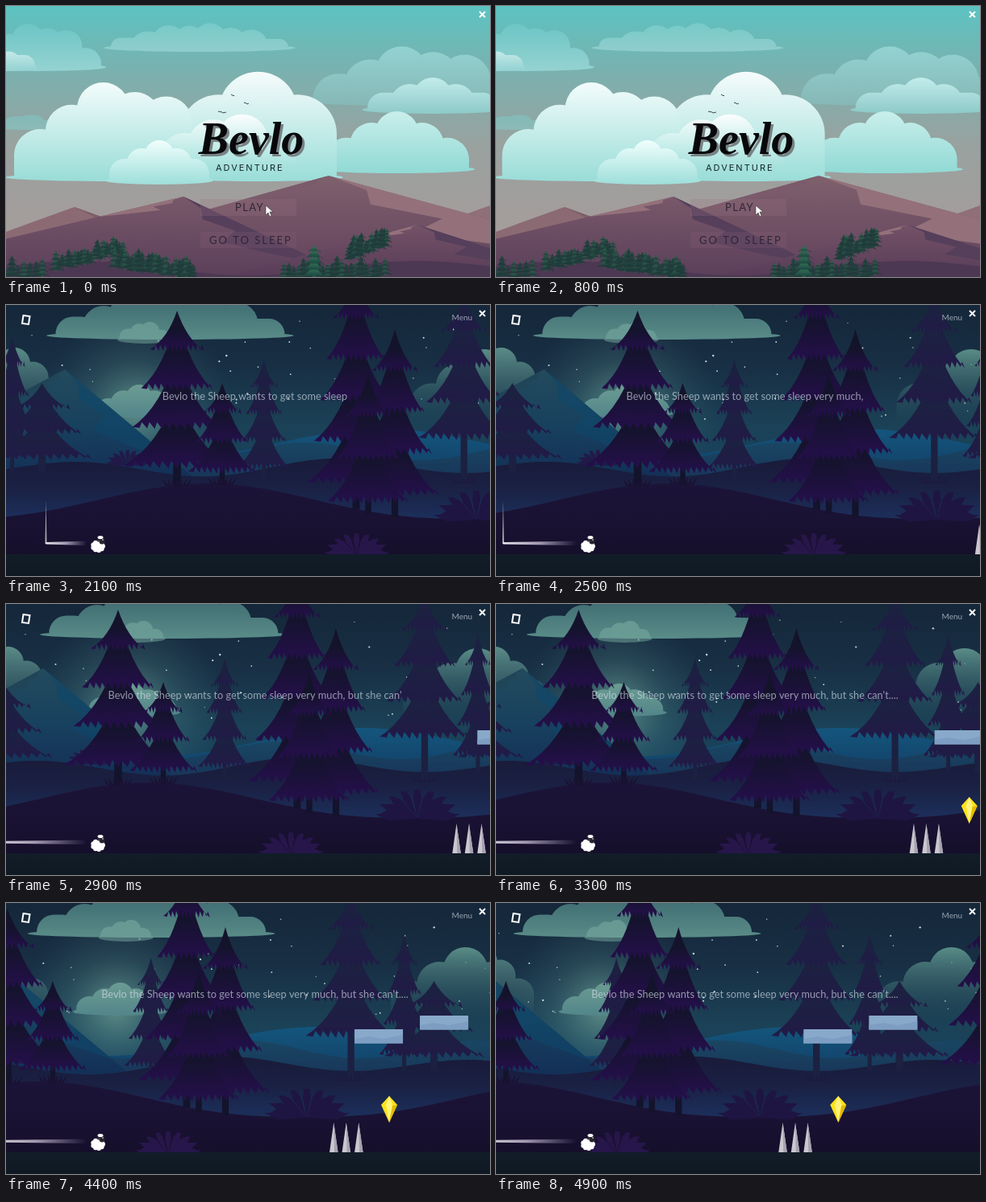
An HTML page with a canvas that plays this animation: 600 px wide and 337 px high, repeating every 5 s.

```html
<!DOCTYPE html>
<html lang="en">
<head>
<meta charset="utf-8">
<style>
html, body { margin: 0; width: 100%; height: 100%; overflow: hidden; background: #132537; }
canvas { display: block; width: 100vw; height: 100vh; }
</style>
</head>
<body>
<canvas id="stage" width="600" height="337"></canvas>
<script>
const g = document.getElementById('stage').getContext('2d');
const HERO = 'Bevlo';
const STORY = HERO + " the Sheep wants to get some sleep very much, but she can't....";
const TAU = Math.PI * 2;

// Repeatable noise from 0 to 1
const noise = n => {
  const v = Math.sin(n * 12.9898) * 43758.5453;
  return v - Math.floor(v);
};
const wave = (x, crest, period) => Math.cos(TAU * (x - crest) / period);

function fade(y0, y1, ...colors) {
  const f = g.createLinearGradient(0, y0, 0, y1);
  colors.forEach((c, i) => f.addColorStop(i / (colors.length - 1), c));
  return f;
}

function rect(x, y, w, h, fill) {
  g.fillStyle = fill;
  g.fillRect(x, y, w, h);
}

function trace(p) {
  g.beginPath();
  for (let i = 0; i < p.length; i += 2) g.lineTo(p[i], p[i + 1]);
}

function poly(fill, ...p) {
  g.fillStyle = fill;
  trace(p);
  g.fill();
}

function line(color, width, ...p) {
  g.strokeStyle = color;
  g.lineWidth = width;
  trace(p);
  g.stroke();
}

function ellipse(x, y, rx, ry, fill) {
  g.fillStyle = fill;
  g.beginPath();
  g.ellipse(x, y, rx, ry, 0, 0, TAU);
  g.fill();
}

function text(str, x, y, font, fill, spacing = 0, align = 'left') {
  g.font = font;
  g.letterSpacing = spacing + 'px';
  g.textAlign = align;
  g.fillStyle = fill;
  g.fillText(str, x, y);
}

function shifted(dx, draw) {
  g.save();
  g.translate(dx, 0);
  draw();
  g.restore();
}

function tile(shift, period, draw) {
  for (let x = -shift - period; x < 600; x += period) shifted(x, draw);
}

// Ground below the height function
function ridge(fill, height, shift = 0) {
  g.fillStyle = fill;
  g.beginPath();
  g.moveTo(0, 337);
  for (let x = 0; x <= 600; x += 5) g.lineTo(x, height(x + shift));
  g.lineTo(600, 337);
  g.fill();
}

// Round-topped columns under an arch, on a thin flat base
function cloud(x0, x1, base, h, n, top, bottom) {
  const w = x1 - x0, r = w / n * .75;
  g.fillStyle = fade(base - h, base, top, bottom);
  g.beginPath();
  for (let i = 0; i < n; i++) {
    const lift = h * Math.sqrt(Math.sin(Math.PI * (i + .5) / n)) * (i % 2 ? .9 : 1);
    g.roundRect(x0 + (w - 2 * r) * i / (n - 1), base - lift, 2 * r, lift, [r, r, 5, 5]);
  }
  const mid = (x0 + x1) / 2;
  g.moveTo(mid + w * .54, base - 2);
  g.ellipse(mid, base - 2, w * .54, 5, 0, 0, TAU);
  g.fill();
}

// Slope face with a jagged inner edge
function face(x, y, w, h, color) {
  const p = [x, y, x + w, y + h];
  for (let i = 5; i > 0; i--) p.push(x + w * i / 6 * (i % 2 ? .72 : .4), y + h * i / 6);
  poly(color, ...p);
}

function mountain(x, y, left, right, base, fill, leftFace, rightFace) {
  const h = base - y;
  poly(fill, x - left, base, x, y, x + right, base);
  face(x, y, -left * .25, h * .25, leftFace);
  face(x, y, right * .85, h * .85, rightFace);
}

function tree(x, top, bottom, half, tiers, foot, dark, edge) {
  const step = (bottom - top) / tiers, trunk = half * .13 + 1;
  rect(x - trunk / 2, bottom - step / 2, trunk, foot - bottom + step / 2, dark);
  for (let i = tiers - 1; i >= 0; i--) {
    const y0 = Math.max(top, top + step * (i - .9)), y1 = top + step * (i + 1);
    const w = half * (.35 + .65 * (i + 1) / tiers), bend = y0 + (y1 - y0) * .72;
    const tooth = Math.min(6, step * .16);
    g.fillStyle = fade(y0, y1, dark, dark, edge);
    g.beginPath();
    g.moveTo(x, y0);
    g.quadraticCurveTo(x + w * .34, bend, x + w, y1 + 2);
    for (let u = .86; u > -.9; u -= .17) {
      g.lineTo(x + w * (u + .05), y1 - tooth);
      g.lineTo(x + w * u, y1 + tooth * .5 * (1 - u * u));
    }
    g.lineTo(x - w, y1);
    g.quadraticCurveTo(x - w * .34, bend, x, y0);
    g.fill();
  }
}

// Small pines scattered around a line
function grove(x0, y0, x1, y1, n) {
  for (let i = 0; i < n; i++) {
    const u = i / (n - 1), h = 15 + 14 * noise(i + x0);
    const x = x0 + (x1 - x0) * u, y = y0 + (y1 - y0) * u + 6 * noise(i * 3 + x1);
    tree(x, y - h, y - 2, h * .36, 4, y, i % 3 ? '#25453f' : '#2d5a49', '#1c3638');
  }
}

function fern(x, y, r, fill) {
  for (let a = -1.4; a < 1.5; a += .35) {
    const s = Math.sin(a), c = Math.cos(a) * .72, w = r * .14;
    poly(fill, x, y, x + r * s * .7 - w * c, y - r * c * .7 - w * s, x + r * s - w / 2, y - r * c,
      x + r * s + w / 2, y - r * c, x + r * s * .75 + w * c, y - r * c * .7 + w * s);
  }
}

function grass(x, y, fill) {
  for (let i = -3; i <= 3; i++) poly(fill, x + i * 4 - 2, y, x + i * 6, y - 9, x + i * 4 + 2, y);
}

function closeMark() {
  line('#fff', 2, 587, 7, 594, 14);
  line('#fff', 2, 594, 7, 587, 14);
}

// ---- Menu ----
function menuSky() {
  cloud(-40, 118, 78, 57, 6, '#6cc5c5', '#93d2d1');
  cloud(-30, 36, 78, 24, 3, '#c9eceb', '#98d4d3');
  cloud(-20, 66, 151, 16, 4, '#83b9b7', '#8bbab7');
  cloud(130, 350, 54, 33, 8, '#76cac9', '#8ecdcc');
  cloud(380, 640, 121, 72, 6, '#93d3d2', '#86b8b6');
  cloud(448, 610, 131, 42, 5, '#c2edeb', '#90cbca');
  cloud(395, 574, 205, 74, 5, '#c9efec', '#93dad5');
  cloud(215, 410, 215, 148, 3, '#ffffff', '#9cded9');
  cloud(10, 270, 215, 122, 6, '#f4fdfc', '#9bddd8');
  cloud(190, 360, 200, 68, 4, '#ffffff', 'rgba(200,240,236,0)');
  cloud(128, 252, 219, 52, 5, '#f0fffd', '#a2e0dc');
}

function menu(k) {
  rect(0, 0, 600, 337, fade(0, 260, '#5cc3c1', '#7cb0ae', '#99a29f', '#a39d9c'));
  shifted(-.4 * Math.max(0, k - 2), menuSky);

  const rock = '#7b5b6b', lit = '#94717a', dark = '#553f5b';
  mountain(85, 250, 240, 240, 337, '#8b6a74', '#8b6a74', '#7d5e6b');
  mountain(612, 244, 260, 260, 337, '#8f6f78', '#8f6f78', lit);
  mountain(400, 211, 450, 460, 337, fade(211, 300, '#7f606c', '#694a61'), rock, lit);
  mountain(220, 237, 420, 210, 337, fade(237, 337, '#78586a', '#5b3f5a'), lit, dark);
  mountain(510, 272, 240, 200, 337, fade(272, 337, '#745267', '#583c58'), lit, dark);
  ridge('#4c3852', x => 326 + 9 * wave(x, 300, 420));
  grove(62, 326, 145, 305, 22);
  grove(135, 322, 232, 337, 24);
  grove(425, 312, 472, 294, 16);
  grove(345, 337, 470, 335, 22);
  grove(0, 337, 45, 337, 7);
  tree(382, 297, 336, 17, 5, 338, '#2f6a52', '#1c4440');

  for (const [x, y, r] of [[281, 111, 2], [268, 132, 5], [298, 121, 3]])
    line('#3d4950', 1, x - r, y - 1, x, y, x + 1, y + 1, x + r, y);
  const logo = 'italic bold 56px "Liberation Serif", serif';
  text(HERO, 307, 187, logo, '#788285', 0, 'center');
  text(HERO, 304, 184, logo, '#08080b', 0, 'center');
  text('ADVENTURE', 260, 205, '11px Inter, sans-serif', '#172528', 2);
  rect(241, 240, 119, 21, 'rgba(150,112,128,.25)');
  rect(241, 281, 119, 20, 'rgba(130,91,116,.25)');
  const label = '13px Lato, sans-serif';
  text('PLAY', 284, 255, label, '#302637', 1.4);
  text('GO TO SLEEP', 252, 296, label, '#302637', 2);
  closeMark();
  const arrow = [322, 248, 322, 260, 325, 257, 327, 262, 329, 261, 327, 256, 331, 256, 322, 248];
  poly('#fff', ...arrow);
  line('#333', .6, ...arrow);
}

// ---- Night level ----
function nightSky() {
  const glow = g.createRadialGradient(165, 130, 5, 165, 130, 120);
  glow.addColorStop(0, 'rgba(125,175,158,.65)');
  glow.addColorStop(.5, 'rgba(85,140,138,.25)');
  glow.addColorStop(1, 'rgba(60,110,120,0)');
  rect(20, 0, 300, 270, glow);
  for (let i = 0; i < 60; i++) {
    const r = .5 + .7 * noise(i + 200);
    ellipse(640 * noise(i + 1), 20 + 125 * noise(i + 90), r, r, '#c6dad9');
  }
  cloud(66, 350, 40, 58, 8, '#38646c', '#588a87');
  cloud(145, 208, 45, 25, 4, 'rgba(130,180,168,.5)', 'rgba(120,170,160,.5)');
  cloud(-50, 80, 145, 92, 5, '#5b8c88', 'rgba(70,115,120,0)');
  cloud(115, 224, 137, 38, 5, '#6c9c93', '#54878a');
  cloud(505, 690, 150, 95, 5, '#5a8d87', 'rgba(40,85,100,0)');
}

function spruce(...shape) {
  tree(...shape, '#14132c', '#240f4a');
}

function paleSpruce(...shape) {
  tree(...shape, '#1c2141', '#211a47');
}

function midTrees() {
  paleSpruce(35, 38, 188, 31, 4, 209);
  paleSpruce(72, 97, 190, 62, 3, 209);
  paleSpruce(347, 68, 202, 33, 4, 217);
  paleSpruce(595, -12, 165, 56, 4, 223);
  fern(178, 199, 26, '#211a47');
  grass(595, 222, '#1d1a40');
}

function nearTrees() {
  spruce(253, 7, 200, 66, 4, 226);
  spruce(309, 97, 207, 42, 3, 224);
  spruce(475, -35, 220, 60, 5, 254);
  spruce(523, 30, 235, 55, 4, 264);
  spruce(490, 85, 244, 50, 3, 260);
  fern(624, 267, 50, '#1f1542');
  grass(253, 225, '#1b1233');
  grass(309, 223, '#1b1233');
}

function level() {
  for (let x = 680; x < 715; x += 15.5) {
    poly('#cbc7cf', x, 310, x + 5.2, 273, x + 10.5, 310);
    poly('#a7a2b0', x + 5.2, 273, x + 10.5, 310, x + 6, 310);
  }
  poly('#ffe31c', 744, 251, 754, 240, 764, 251, 754, 273);
  poly('#fff37c', 754, 240, 758, 251, 754, 273, 750, 251);
  poly('#e5b900', 764, 251, 754, 273, 758, 252);
  for (const [x, y] of [[711, 157], [792, 140]]) {
    rect(x, y, 60, 17.5, '#88a9ca');
    poly('#7d9ec2', x, y + 12, x + 18, y + 9, x + 36, y + 12, x + 60, y + 7, x + 60, y + 17.5, x, y + 17.5);
  }
}

function sheep(x, y) {
  rect(x - 4, y + 7, 2, 5, '#18141e');
  rect(x + 3, y + 7, 2, 5, '#18141e');
  for (let a = 0; a < TAU; a += TAU / 9)
    ellipse(x + 6 * Math.cos(a), y + 2 + 5 * Math.sin(a), 3, 3, '#fff');
  ellipse(x, y + 2, 7, 6, '#fff');
  ellipse(x + 5, y - 5, 3.6, 4.5, '#272330');
  ellipse(x + 1, y - 5, 2.4, 1.4, '#3b3540');
  ellipse(x + 3, y - 9, 3.5, 2, '#fff');
  ellipse(x + 6, y - 6, .8, .8, '#fff');
}

function trail(x, run, y) {
  if (!run) {
    poly('rgba(190,202,240,.65)', x, 243, x + 4, y - 7, x - 4, y - 7);
    return;
  }
  poly('rgba(230,230,235,.75)', x, 243, x + 1, 297, x - 1, 297);
  const start = Math.max(x, -25), f = g.createLinearGradient(start, 0, 100, 0);
  f.addColorStop(0, 'rgba(255,255,255,.9)');
  f.addColorStop(.5, 'rgba(235,225,245,.65)');
  f.addColorStop(1, 'rgba(210,200,235,0)');
  poly(f, start, 295, 100, 293.5, 100, 299, start, 297.5);
}

function night(k) {
  const run = 10.15 * Math.max(0, k - 14.35);
  const cam = Math.max(0, run - 22);
  const y = Math.min(298, 250 + 1.6 * (k - 9) ** 2);

  rect(0, 0, 600, 337, fade(0, 230, '#15273a', '#182f44', '#1b4257', '#15405f'));
  shifted(-cam * .1, nightSky);
  ridge(fade(150, 225, '#14577e', '#123a62'), x => 172 - 18 * wave(x, 480, 520), cam * .33);
  ridge(fade(165, 225, '#1a4864', '#173257'), x => 182 - 11 * wave(x, 385, 290), cam * .33);
  shifted(-cam * .33, () => mountain(88, 80, 250, 160, 215,
    fade(80, 215, '#234a5c', '#18415f', '#132f56'), '#204558', 'rgba(14,72,108,.55)'));
  ridge(fade(188, 268, '#191a38', '#1a2144', '#1c305c'),
    x => 202 - 9 * wave(x, 120, 313) + 3 * wave(x, 200, 626), cam * .6);
  tile(cam * .6, 626, midTrees);
  ridge(fade(220, 310, '#1c1438', '#1a1233', '#150f2b'),
    x => 266 - 44 * ((1 + wave(x, 290, 660)) / 2) ** 1.4, cam * .9);
  tile(cam * .9, 660, nearTrees);
  fern(480 - cam, 312, 39, '#27164a');
  rect(0, 310, 600, 27, fade(310, 337, '#111d28', '#0f1923'));
  shifted(-cam, level);
  trail(95 - cam, run, y);
  sheep(92 + run - cam, y);

  line('#fff', 2, 21.5, 13, 29.5, 14, 28, 24, 20, 23, 21.5, 13, 24, 13.3);
  text('Menu', 552.5, 19, '10px Lato, sans-serif', 'rgba(225,232,240,.65)');
  closeMark();
  const typed = Math.floor(14.9 + 3.02 * (k - 13));
  text(STORY.slice(0, typed).trim(), 308.5, 118, '12.75px Lato, sans-serif', 'rgba(216,224,234,.65)', 0, 'center');
}

const begin = performance.now();
function draw() {
  const k = Math.floor((performance.now() - begin) % 5000 / 100);
  if (k < 9) menu(k);
  else night(k);
  requestAnimationFrame(draw);
}
draw();
</script>
</body>
</html>
```
